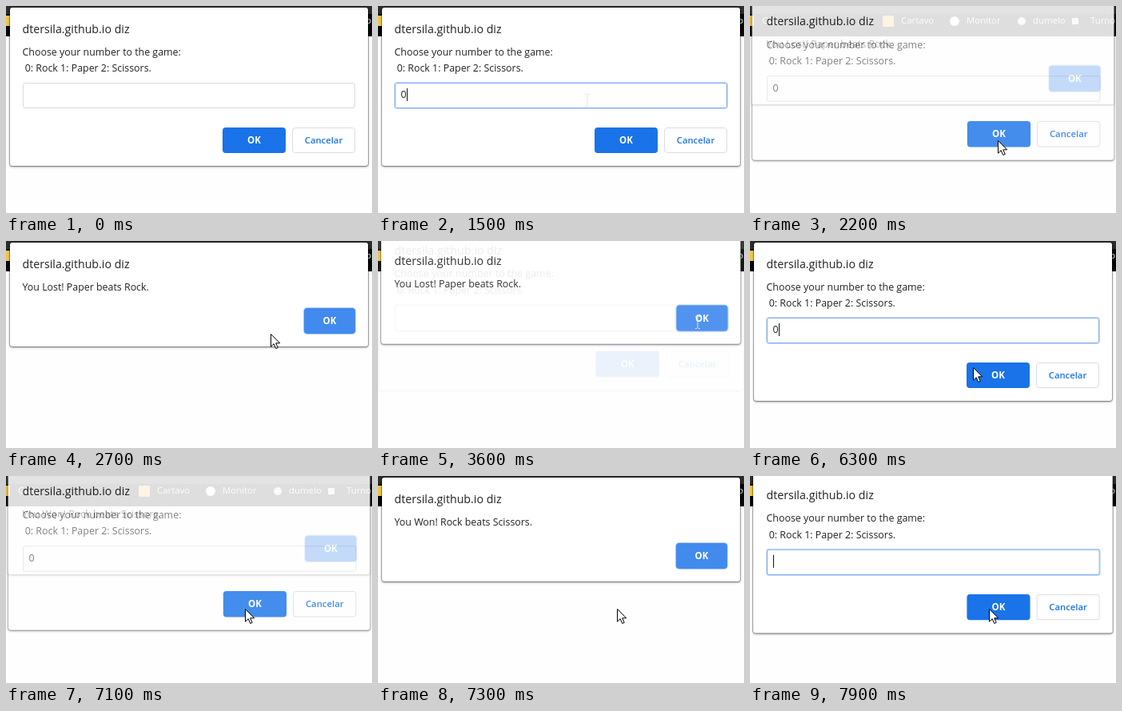
An HTML page that plays this animation: 458 px wide and 259 px high, repeating every 8000 ms.

```html
<!DOCTYPE html>
<html lang="pt">
<head>
<meta charset="utf-8">
<title>Rock, paper, scissors</title>
<style>
  html, body { margin: 0; width: 100%; height: 100%; overflow: hidden; background: #fefefe; }
  body { font: 12.4px/20px "Open Sans", "Noto Sans", sans-serif; color: #202124; }
  #stage { position: relative; width: 458px; height: 259px; overflow: hidden; background: #fefefe; }
  #stage * { position: absolute; box-sizing: border-box; white-space: pre; }
  #bar { left: 0; top: 0; width: 458px; height: 38px; color: #fff; font-size: 11.4px;
    background: linear-gradient(#2c2c2c 10px, #060606 10px); }
  #bar span { top: 8px; }
  .dialog { inset: 0; transform-origin: 21px 30px; }
  .panel { top: 2px; background: #fff; border-radius: 3px;
    box-shadow: 0 0 0 1px rgba(0,0,0,.24), 0 1px 3px rgba(0,0,0,.5); }
  .title { left: 20.5px; top: 19px; font-size: 14.2px; }
  .line { left: 20.5px; top: 48px; }
  .button { width: 79px; height: 32px; border-radius: 4px; background: #1a73e8; color: #fff;
    font-size: 11.5px; font-weight: 700; line-height: 32px; text-align: center; }
  .plain { background: #fff; color: #1a73e8; border: 1px solid #dadce0;
    font-size: 11.3px; font-weight: 600; line-height: 30px; }
  .ring { background: #428aee; box-shadow: 0 0 0 1px #b4d0fa; }
  #field { left: 21px; top: 96px; width: 416px; height: 32px; border-radius: 3px; border: 1px solid #d8dadd; }
  #field.focus { border-color: #84ade9; box-shadow: 0 0 0 1px rgba(138,180,248,.5); }
  #typed { left: 28.5px; top: 101px; }
  #caret { top: 103px; width: 1px; height: 16px; background: #111; }
  #mouse { left: 0; top: 0; z-index: 9; overflow: visible; }
</style>
</head>
<body>
<div id="stage">
  <div id="bar"></div>

  <div class="dialog" id="prompt">
    <div class="panel" style="height:198px"></div>
    <div class="title">dtersila.github.io diz</div>
    <div class="line">Choose your number to the game:
 0: Rock 1: Paper 2: Scissors.</div>
    <div id="field"></div>
    <div id="typed">0</div>
    <div id="caret"></div>
    <div class="button" style="left:271px;top:152px">OK</div>
    <div class="button plain" style="left:358px;top:152px">Cancelar</div>
  </div>

  <div class="dialog" id="alert">
    <div class="panel" style="height:130px"></div>
    <div class="title">dtersila.github.io diz</div>
    <div class="line" id="result"></div>
    <div class="button ring" style="left:373px;top:84px;width:64px">OK</div>
  </div>

  <svg id="mouse" width="13" height="20">
    <path id="arrow" d="M.5.5V16.2l3.7-3.5 2.5 5.8 2.5-1.1-2.5-5.6h5z" fill="#fff" stroke="#000"/>
    <path id="beam" d="M-3-7.5H-1L0-6.5 1-7.5H3M0-6.5V6.5M-3 7.5H-1L0 6.5 1 7.5H3" fill="none" stroke="#e6e6e6"/>
  </svg>
</div>

<script>
const LOOP = 8000, STEP = 100;
const $ = id => document.getElementById(id);

// Bookmark bar: labels and plain marks
const labels = [[15, 'Guia'], [189, 'Cartavo'], [271, 'Monitor'], [354, 'dumelo'], [426, 'Turno']];
const marks = [[0, 12, 5, 13, '#f2c744', 0], [166, 12, 14, 14, '#f6b32a', 0],
  [250, 13, 12, 12, '#fff', 6], [335, 14, 10, 10, '#ddd', 5], [403, 15, 8, 8, '#ddd', 0]];
for (const [x, text] of labels) {
  const el = document.createElement('span');
  el.textContent = text;
  el.style.left = x + 'px';
  $('bar').append(el);
}
for (const [x, y, w, h, color, r] of marks) {
  const el = document.createElement('i');
  el.style.cssText =
    `left:${x}px;top:${y}px;width:${w}px;height:${h}px;background:${color};border-radius:${r}px`;
  $('bar').append(el);
}

// Dialog states: [time, prompt lift, prompt opacity, alert lift, alert opacity, dialog in front]
const toAlert = t => [
  [t, .12, .97, 1, 0, 'alert'],
  [t + 100, .55, .81, .58, .3, 'alert'],
  [t + 200, .95, .12, .22, 1, 'alert'],
  [t + 300, 1, 0, 0, 1, 'alert']];
const toPrompt = t => [
  [t, 1, .08, .22, 1, 'prompt'],
  [t + 100, .27, 1, 1, 0, 'prompt'],
  [t + 200, 0, 1, 1, 0, 'prompt']];
const dialogs = [[0, 0, 1, 1, 0, 'prompt'],
  ...toAlert(2100), ...toPrompt(3600), ...toAlert(7000), ...toPrompt(7800)];

// Pointer path: [time, x, y, shape]; it glides between rows of the same shape
const path = [
  [0, 0, 0, ''], [200, 79, 45, 'arrow'], [300, 0, 0, ''],
  [1500, 262, 118, 'beam'], [1600, 291, 138, 'arrow'], [1700, 305, 149, 'arrow'],
  [1800, 305, 149, 'arrow'], [1900, 310, 168, 'arrow'], [2400, 310, 168, 'arrow'],
  [2700, 331, 116, 'arrow'], [2800, 331, 116, 'arrow'], [3100, 401, 101, 'arrow'],
  [3500, 401, 101, 'arrow'], [3600, 400, 102, 'beam'], [3900, 235, 121, 'beam'],
  [4300, 235, 121, 'beam'], [4700, 210, 119, 'beam'], [6000, 210, 119, 'beam'],
  [6100, 238, 139, 'arrow'], [6300, 279, 158, 'arrow'], [6500, 299, 166, 'arrow']];

const focusOn = [[800, 2100], [3600, 7000], [7800, LOOP]];
const typedOn = [[1400, 2500], [6000, 7300]];
const caretOn = [[800, 1300], [1400, 1900], [3700, 4200], [4700, 5200], [5800, 6500], [7900, LOOP]];

const within = (spans, t) => spans.some(([a, b]) => t >= a && t < b);
const rowAt = (rows, t) => rows.findLastIndex(row => row[0] <= t);
const show = (el, on) => { el.style.visibility = on ? 'inherit' : 'hidden'; };

function pose(el, lift, opacity, front) {
  el.style.opacity = opacity;
  el.style.zIndex = front ? 2 : 1;
  el.style.transform = lift
    ? `translateY(${-17.5 * lift}px) scale(${1 + .006 * lift}, ${1 + .025 * lift})` : 'none';
  const panel = el.firstElementChild.style;
  panel.left = 5 - 4.5 * lift + 'px';
  panel.width = 448 + 6 * lift + 'px';
}

function placeMouse(t) {
  const i = rowAt(path, t);
  let [start, x, y, shape] = path[i];
  const next = path[i + 1];
  if (next && next[3] === shape) {
    const p = (t - start) / (next[0] - start);
    x += (next[1] - x) * p;
    y += (next[2] - y) * p;
  }
  $('mouse').style.transform = `translate(${Math.round(x)}px, ${Math.round(y)}px)`;
  show($('arrow'), shape === 'arrow');
  show($('beam'), shape === 'beam');
}

function draw(t) {
  const [, pLift, pAlpha, aLift, aAlpha, front] = dialogs[rowAt(dialogs, t)];
  pose($('prompt'), pLift, pAlpha, front === 'prompt');
  pose($('alert'), aLift, aAlpha, front === 'alert');
  $('result').textContent = t < 5000 ? 'You Lost! Paper beats Rock.' : 'You Won! Rock beats Scissors.';
  const typed = within(typedOn, t);
  $('field').classList.toggle('focus', within(focusOn, t));
  show($('typed'), typed);
  show($('caret'), within(caretOn, t));
  $('caret').style.left = (typed ? 36 : 29) + 'px';
  placeMouse(t);
}

const begin = performance.now();
let last = -1;
function tick() {
  const t = Math.floor((performance.now() - begin) % LOOP / STEP) * STEP;
  if (t !== last) draw(last = t);
  requestAnimationFrame(tick);
}
tick();
</script>
</body>
</html>
```
